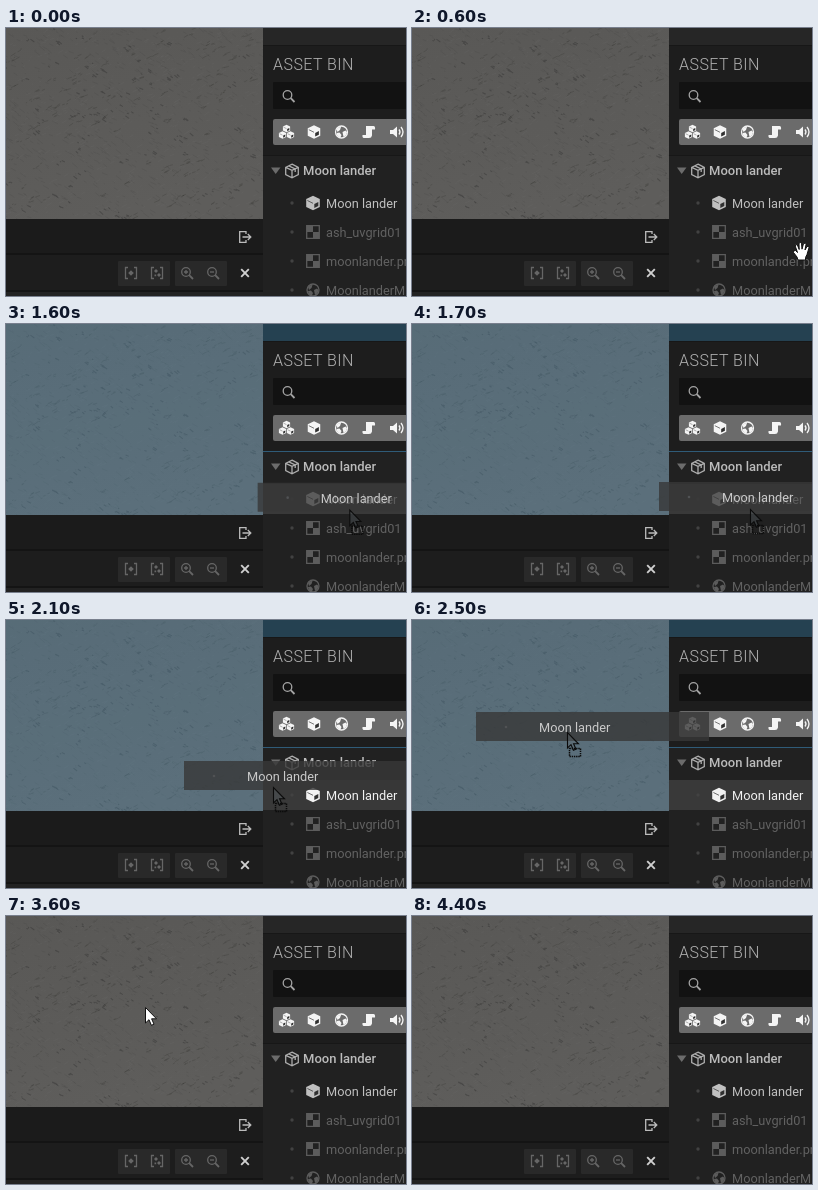
These frames come from a looping animation (400 px wide and 268 px high, 5100 ms). An HTML page:

```html
<!DOCTYPE html>
<html lang="en">
<head>
<meta charset="utf-8">
<title>Asset bin drag</title>
<style>
  html, body { margin: 0; width: 100%; height: 100%; overflow: hidden; background: #1d1d1d; }
  svg { display: block; width: 400px; height: 268px; }
  text { font: 12.75px Roboto, sans-serif; }
  .title { font-size: 16px; font-weight: 300; letter-spacing: .45px; }
  .medium { font-size: 13px; font-weight: 500; }
  .line { fill: none; stroke: currentColor; stroke-width: 1.3; }
</style>
</head>
<body>
<svg viewBox="0 0 400 268" xmlns="http://www.w3.org/2000/svg">
  <defs>
    <clipPath id="viewClip"><path d="M0 0H257V191H0Z"/></clipPath>
    <linearGradient id="ground" x1="0" y1="0" x2=".3" y2="1">
      <stop offset="0" stop-color="#595856"/><stop offset="1" stop-color="#5e5d5b"/>
    </linearGradient>
    <g id="cube">
      <path d="M0-7.3 6.8-4V4L0 7.3-6.8 4V-4Z" fill="currentColor"/>
      <path d="M1.3 1 5.3-1V3L1.3 5Z" fill="#303030"/>
      <path d="M-5.6-2.5 0 .3" fill="none" stroke="#303030" stroke-width=".7"/>
    </g>
    <g id="package">
      <path class="line" d="M0-6.8 6.3-3.7V3.7L0 6.8-6.3 3.7V-3.7ZM-6.3-3.7 0-.6 6.3-3.7M0-.6V6.8M-3.2-5.2 3.2-2.1V1"/>
    </g>
    <g id="ball">
      <circle class="line" r="6"/>
      <path d="M-5-3Q-3-5.5-.5-5L-1.5-2-4 0ZM-5 1-2 .5 0 3-1 5.5Q-4.5 5-5 1ZM1 0 4-1.5 5.5 0Q5 4 2 5Z" fill="currentColor"/>
    </g>
    <g id="checker">
      <path class="line" d="M-6.3-6.3H6.3V6.3H-6.3Z"/>
      <path d="M-6-6H0V0H-6ZM0 0H6V6H0Z" fill="currentColor"/>
    </g>
    <path id="scroll" d="M-2.5-6H5Q7-6 6.5-2.5H3.5V3.5Q3 6 .5 6H-5Q-6.5 5.5-6 3H-2.5Z" fill="currentColor"/>
    <g id="lens">
      <circle class="line" cx="-1" cy="-1" r="4.3"/>
      <path class="line" d="M2.2 2.2 6 6" style="stroke-width:1.8"/>
    </g>
    <path id="brackets" class="line" d="M-3-5.5H-5.5V5.5H-3M3-5.5H5.5V5.5H3"/>
    <path id="arrow" d="M.5.5V16L4 12.7 6.4 18.3 9 17.2 6.6 11.8H11.5Z"/>
  </defs>

  <path d="M0 0H400V268H0Z" fill="#1d1d1d"/>
  <g clip-path="url(#viewClip)">
    <path d="M0 0H257V191H0Z" fill="url(#ground)"/>
    <g id="grain" fill="none"></g>
  </g>
  <path d="M257 0H400V17H257Z" fill="#262626"/>
  <g id="tint">
    <path d="M0 0H257V191H0Z" fill="rgb(84,152,194)" fill-opacity=".3"/>
    <path d="M257 0H400V17H257Z" fill="#254151"/>
  </g>

  <path d="M0 191H257V225H0Z" fill="#1b1b1b"/>
  <path d="M0 225H257V227H0ZM0 262H257V264H0Z" fill="#141414"/>
  <path d="M0 264H257V268H0Z" fill="#222"/>
  <g fill="#292929">
    <rect x="112" y="233" width="52" height="25" rx="1"/>
    <rect x="169" y="233" width="52" height="25" rx="1"/>
  </g>
  <g color="#666">
    <g transform="translate(125 245)">
      <use href="#brackets"/>
      <path d="M0-2.8 2.8 0 0 2.8-2.8 0Z" fill="currentColor"/>
    </g>
    <g transform="translate(151 245)">
      <use href="#brackets"/>
      <path d="M-1-4 1-2-1 0-3-2ZM2 0 4 2 2 4 0 2ZM-2.5 1.5H-.8V3.2H-2.5Z" fill="currentColor"/>
    </g>
    <use href="#lens" x="181" y="245"/><path class="line" d="M178 244H182M180 242V246"/>
    <use href="#lens" x="207" y="245"/><path class="line" d="M204 244H208"/>
  </g>
  <path d="M235.2 241.2 242.8 248.8M242.8 241.2 235.2 248.8" stroke="#d0d0d0" stroke-width="1.9"/>
  <g color="#bcbcbc">
    <path class="line" d="M240 206V203.7H233.7V214.3H240V212"/>
    <path class="line" d="M236.5 209H244M241.8 206 244.8 209 241.8 212"/>
  </g>

  <path d="M257 17H400V18H257Z" fill="#171717"/>
  <text class="title" x="267" y="42" fill="#b0b0b0">ASSET BIN</text>
  <rect x="267" y="54" width="140" height="27" rx="1" fill="#121212"/>
  <use href="#lens" x="282.5" y="68" color="#a4a4a4"/>
  <rect x="267" y="91" width="140" height="26" rx="2" fill="#6b6b6b"/>
  <g color="#f4f4f4">
    <use href="#cube" transform="translate(280.5 100.5) scale(.53)"/>
    <use href="#cube" transform="translate(276.5 107) scale(.53)"/>
    <use href="#cube" transform="translate(284.5 107) scale(.53)"/>
    <use href="#cube" transform="translate(308 104) scale(.92)"/>
    <use href="#ball" x="335.5" y="104"/>
    <use href="#scroll" x="362.5" y="104"/>
    <g transform="translate(390 104)">
      <path d="M-6-2H-3L1-5.5V5.5L-3 2H-6Z" fill="currentColor"/>
      <path class="line" d="M3-2.5Q5 0 3 2.5M5-5Q9 0 5 5"/>
    </g>
  </g>
  <path d="M257 128H400V268H257Z" fill="#212121"/>
  <path d="M257 127H400V128H257Z" fill="#171717"/>
  <path id="dropLine" d="M257 127H400V128H257Z" fill="#2f5b78"/>
  <path id="hover" d="M257 160H400V190H257Z" fill="#393939"/>
  <path d="M265 139.5H274.5L269.7 146Z" fill="#6c6c6c"/>
  <use href="#package" x="286" y="143" color="#adadad"/>
  <text class="medium" x="297" y="147.4" fill="#bcbcbc">Moon lander</text>
  <g id="bullets" fill="#424242"></g>
  <g id="item">
    <use href="#cube" x="307" y="175" color="currentColor"/>
    <text x="320" y="179.7" fill="currentColor">Moon lander</text>
  </g>
  <g color="#5c5c5c" fill="#626262">
    <use href="#checker" x="307" y="204"/>
    <text x="320" y="208.7">ash_uvgrid01</text>
    <use href="#checker" x="307" y="233"/>
    <text x="320" y="237.7">moonlander.png</text>
    <use href="#ball" x="307" y="262"/>
    <text x="320" y="266.7">MoonlanderMat</text>
  </g>

  <g id="ghost">
    <path d="M0 0H233V29H0Z" fill="#383838" fill-opacity=".8"/>
    <circle cx="30" cy="15" r="1.3" fill="#505254"/>
    <text x="63" y="20.2" fill="#cacaca">Moon lander</text>
  </g>
  <g id="hand" fill="#fff" stroke="#111" stroke-linejoin="round">
    <path id="openHand" d="M-3 9 -4 6-7.5 1.5Q-8-1-5.5-.5L-3.5 1.5-5.8-5Q-5.5-7.3-3.6-6L-1.8-1.5-2-7.5Q-.8-9.6.5-7.7L1-1.8 2.4-7Q4-8.8 5-6.5L4-1 6-4.5Q7.8-5.5 8-3.3L6 3.5 4.5 6.5V9Z"/>
    <path id="fist" d="M-3 8-4 5-6.5 1.5V-1L-4-1.5V-3.5L-2-4.5 0-5 2-4.5 4-4 6-2.5V3L4.5 5.5V8Z"/>
  </g>
  <g id="dragger">
    <use href="#arrow" fill="#5e676c" fill-opacity=".35" stroke="#0b0b0b" stroke-width="1.1"/>
    <rect x="2.5" y="16.5" width="11" height="8" fill="none" stroke="#0b0b0b" stroke-width="1.5" stroke-dasharray="1.4 .8"/>
  </g>
  <use id="pointer" href="#arrow" fill="#fff" stroke="#111"/>
</svg>
<script>
const LOOP = 5100, STEP = 100;
const $ = id => document.getElementById(id);

// Each point is [time, x, y].
const handPath = [[500, 396, 231], [700, 382, 215], [1000, 364, 198], [1200, 364, 198], [1300, 361, 197]];
const cursorPath = [[1400, 354, 187], [1700, 338, 185], [1800, 325, 182], [2100, 267, 167],
  [2200, 234, 157], [2400, 169, 130], [2500, 155, 112], [2600, 147, 101], [2800, 139, 91]];
const ghostPath = [[1400, 261, 160], [1700, 247, 158], [1800, 235, 155], [2100, 178, 141],
  [2200, 145, 132], [2400, 79, 107], [2500, 64, 92], [2600, 54, 78], [2700, 47, 69], [2800, 44, 65]];

function along(path, t) {
  if (t <= path[0][0]) return path[0].slice(1);
  for (let i = 1; i < path.length; i++) {
    const [t0, x0, y0] = path[i - 1], [t1, x1, y1] = path[i];
    if (t <= t1) {
      const k = (t - t0) / (t1 - t0);
      return [x0 + (x1 - x0) * k, y0 + (y1 - y0) * k];
    }
  }
  return path[path.length - 1].slice(1);
}

const within = (t, from, to) => t >= from && t < to;

function place(id, visible, [x, y]) {
  const node = $(id);
  node.style.display = visible ? "" : "none";
  node.setAttribute("transform", `translate(${x} ${y})`);
}

function seeded(seed) {
  return () => (seed = (seed * 16807) % 2147483647) / 2147483647;
}

// Fine slanted scratches over the ground, the darkest ones in small clusters.
function drawGrain() {
  const rnd = seeded(4127);
  const layer = (count, cluster, slope, length, color, opacity, width) => {
    let d = "";
    for (let i = 0; i < count; i++) {
      const cx = rnd() * 265 - 5, cy = rnd() * 195 - 2;
      for (let j = 0; j < cluster; j++) {
        const shift = (rnd() - .5) * 6 * (cluster - 1);
        const x = cx + shift, y = cy - shift * .45 + (rnd() - .5) * 3, w = 1 + rnd() * length;
        d += `M${x.toFixed(1)} ${y.toFixed(1)}l${w.toFixed(1)} ${(w * slope * (.5 + rnd())).toFixed(1)}`;
      }
    }
    return `<path d="${d}" stroke="${color}" stroke-opacity="${opacity}" stroke-width="${width}"/>`;
  };
  $("grain").innerHTML =
    layer(700, 1, .6, 5, "#333", .14, .8) +
    layer(500, 1, -.5, 5, "#777", .18, .7) +
    layer(110, 3, -.45, 4, "#2e2e2d", .24, 1) +
    layer(60, 3, .6, 3, "#262626", .34, 1.1);
}

function draw(t) {
  const dragging = within(t, 1400, 3400);
  const hovered = within(t, 800, 3400);
  const tint = !dragging ? 0 : t < 1500 ? .5 : 1;

  $("tint").style.opacity = tint;
  $("dropLine").style.opacity = tint;
  $("hover").style.opacity = hovered ? 1 : 0;
  $("item").style.color = hovered ? "#f2f2f2" : "#c0c0c0";

  const spot = along(cursorPath, t);
  place("ghost", dragging, along(ghostPath, t));
  place("hand", within(t, 500, 1400), along(handPath, t));
  $("openHand").style.display = t < 1300 ? "" : "none";
  $("fist").style.display = t < 1300 ? "none" : "";
  place("dragger", within(t, 1400, 3300), spot);
  place("pointer", within(t, 3300, 4400), spot);
  $("pointer").style.opacity = t < 4300 ? 1 : .5;
}

$("bullets").innerHTML = [175, 204, 233, 262]
  .map(y => `<circle cx="286" cy="${y}" r="1.7"/>`).join("");
drawGrain();

const start = performance.now();
function tick() {
  const t = (performance.now() - start) % LOOP;
  draw(Math.floor(t / STEP) * STEP);
  requestAnimationFrame(tick);
}
tick();
</script>
</body>
</html>
```
